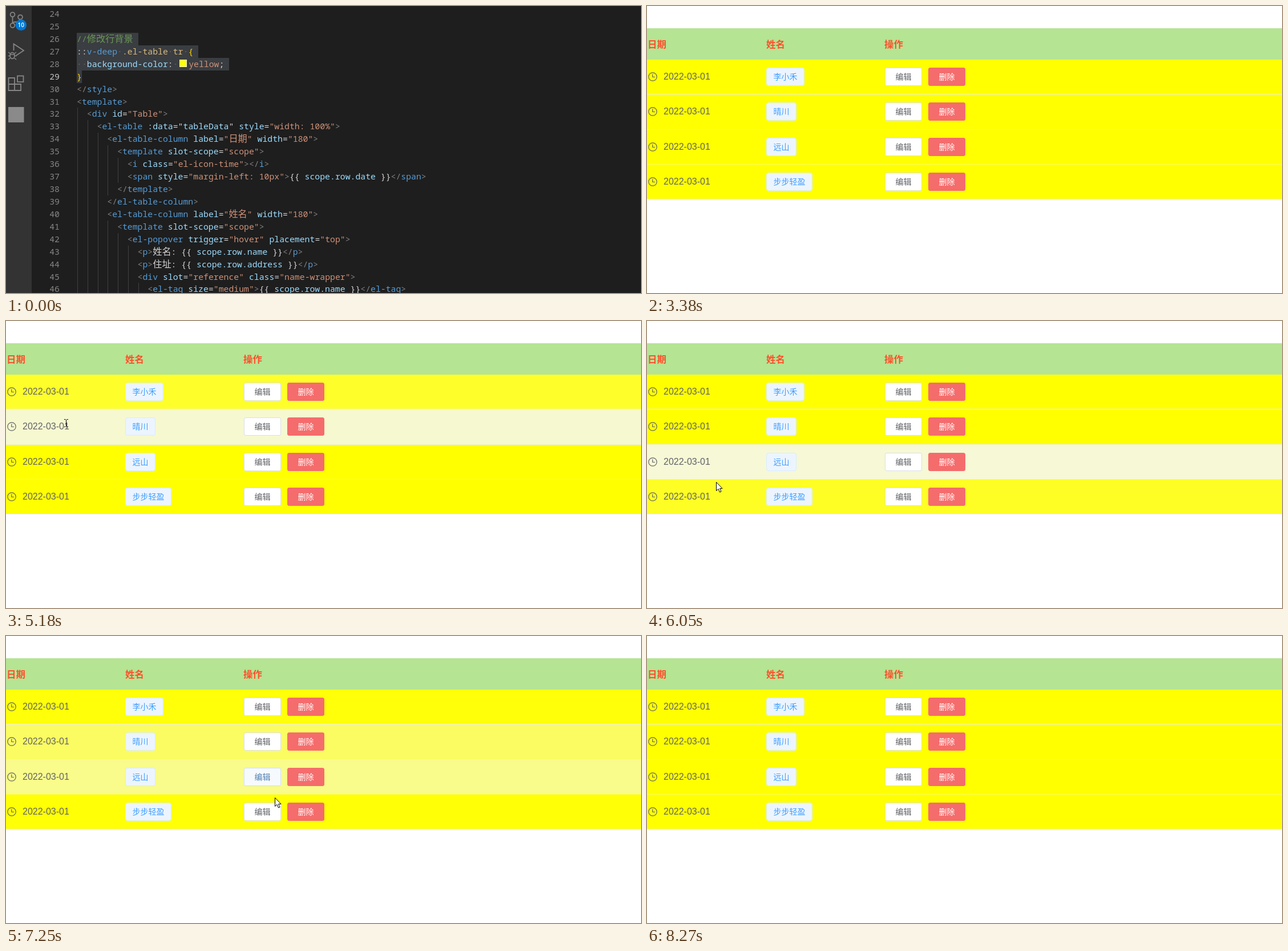
These frames come from a looping animation (1113 by 503 pixels, 8.96 s). An HTML page:

```html
<!DOCTYPE html>
<html lang="zh">
<head>
<meta charset="utf-8">
<title>Table row colours</title>
<style>
html, body { margin: 0; width: 100%; height: 100%; overflow: hidden; }
body { position: relative; background: #fff; }
.view { position: absolute; left: 0; top: 0; width: 1113px; height: 503px; overflow: hidden; }
.view *, .cursor { position: absolute; }

/* editor */
#editor { background: #1e1e1e; }
#bar { left: 0; top: 0; width: 45px; height: 503px; background: #333; }
.line { left: 0; width: 1113px; height: 22px; color: #d4d4d4; white-space: pre;
  font: 14.8px/20px "Noto Sans Mono", "Noto Sans CJK SC", monospace; }
.num { right: 1019px; color: #858585; }
.num.on { color: #c6c6c6; }
.guide { width: 1px; height: 22px; background: #404040; }
.code { left: 124px; height: 22px; }
.code span { position: static; }
.sel { background: #3a3d41; }
.eol { padding-right: 1ch; }
.cj { font: 16.2px/0 "Noto Sans CJK SC", sans-serif; }
.b { color: #808080; } .t { color: #569cd6; } .a { color: #9cdcfe; } .s { color: #ce9178; }
.d { color: #646464; } .k { color: #d7ba7d; } .y { color: #ffd700; } .note { color: #6a9955; }
.code .swatch { display: inline-block; width: 11px; height: 11px; margin: 0 3px 0 2.5px;
  border: 1px solid #eee; background: #ff0; }

/* table page */
#page { background: #fff; font-family: "Noto Sans CJK SC", sans-serif; }
#head { left: 0; top: 39px; width: 1113px; height: 55px; background: #b5e493; }
#head b { top: 0; font-size: 16.4px; line-height: 54px; color: #ff4f2b; }
.row { left: 0; width: 1113px; background: #ff0; border-bottom: 1px solid #ebeef5; }
.row.thin { border-bottom-color: #fbfb60; }
.glow { inset: 0; background: #f5f7fa; opacity: 0; }
.clock { left: 1px; top: 20.5px; width: 18px; height: 18px; }
.date { left: 29px; top: 20px; font: 16px/20px "Liberation Sans", sans-serif; color: #606266; }
.tag, .btn { box-sizing: border-box; top: 14px; height: 32px; font-size: 14px; line-height: 29px;
  border: 1px solid; text-align: center; white-space: nowrap; }
.tag { left: 209px; padding: 0 11.5px; border-radius: 4px; color: #409eff;
  background: #ecf5ff; border-color: #d9ecff; }
.btn { --h: 0%; left: 417px; width: 65px; border-radius: 3px;
  color: color-mix(in srgb, #409eff var(--h), #606266);
  background: color-mix(in srgb, #ecf5ff var(--h), #fff);
  border-color: color-mix(in srgb, #c6e2ff var(--h), #dcdfe6); }
.btn.del { left: 493px; color: #fff; background: #f56c6c; border-color: #f56c6c; }

.cursor { left: 0; top: 0; overflow: visible; pointer-events: none; }
</style>
</head>
<body>
<div class="view" id="editor">
  <div id="bar"></div>
  <svg width="45" height="503" fill="none" stroke="#858585" stroke-width="1.8">
    <circle cx="11.5" cy="15" r="3.9"/><circle cx="11.5" cy="34" r="3.9"/><circle cx="25" cy="19.5" r="3.9"/>
    <path d="M11.5 19v11M25 23.5c0 4-3 4.5-6 4.5h-3q-4 0-4.500 3"/>
    <circle cx="26.300" cy="33.300" r="9.700" fill="#0078d4" stroke="none"/>
    <text x="26.300" y="37" fill="#fff" stroke="none" font-family="Open Sans, sans-serif" font-size="10" font-weight="600" text-anchor="middle">10</text>
    <path d="M13.500 78V66.500L31 78 17.500 87"/>
    <ellipse cx="11" cy="87" rx="4" ry="5.300"/>
    <path d="M7 85h8M4 81l3.500 2.500M18 81l-3.500 2.500M3.500 87.500H7M15 87.500h3.500M4 94l3.500-3M18 94l-3.500-3" stroke-width="1.500"/>
    <path d="M4.500 126h10.500v11h11v11h-21.500zM4.500 137h10.500v11"/>
    <rect x="20" y="122.500" width="10.500" height="10.500"/>
    <rect x="4" y="177" width="27.500" height="27" fill="#8a8a8a" stroke="none"/>
  </svg>
</div>

<div class="view" id="page">
  <div id="head">
    <b style="left:1px">日期</b><b style="left:209px">姓名</b><b style="left:416px">操作</b>
  </div>
</div>

<svg class="cursor" id="arrow" width="14" height="20">
  <path d="M.5.5V15.500L4 12.300 6.500 18 9 17 6.600 11.500H11z" fill="#fff" stroke="#000"/>
</svg>
<svg class="cursor" id="beam" width="7" height="15">
  <path d="M-3 -6.500h2.500M1.500 -6.500h2.500M.5 -6v12M-3 6.500h2.500M1.500 6.500h2.500" fill="none"/>
</svg>

<script>
const $ = id => document.getElementById(id);
const add = (parent, cls, html = '', style = '') => {
  const el = document.createElement('div');
  el.className = cls;
  el.innerHTML = html;
  el.style.cssText = style;
  parent.append(el);
  return el;
};
const span = (cls, s) => `<span class="${cls}">${s}</span>`;

// ---- editor ----
const dot = span('d', '·');
const styles = [
  '', '',
  span('note', '//修改行背景'),
  '::' + span('t', 'v-deep') + dot + span('k', '.el-table') + dot + span('k', 'tr') + dot + span('y', '{'),
  dot + dot + span('a', 'background-color') + ':' + dot + span('swatch', '') + span('s', 'yellow') + ';',
  span('y', '}')
];
const markup = `</style>
<template>
  <div id="Table">
    <el-table :data="tableData" style="width: 100%">
      <el-table-column label="日期" width="180">
        <template slot-scope="scope">
          <i class="el-icon-time"></i>
          <span style="margin-left: 10px">{{ scope.row.date }}</span>
        </template>
      </el-table-column>
      <el-table-column label="姓名" width="180">
        <template slot-scope="scope">
          <el-popover trigger="hover" placement="top">
            <p>姓名: {{ scope.row.name }}</p>
            <p>住址: {{ scope.row.address }}</p>
            <div slot="reference" class="name-wrapper">
              <el-tag size="medium">{{ scope.row.name }}</el-tag>`.split('\n');

const paint = s => s.replace(
  /(<\/?)([\w-]+)|(:\w+)="(\w+)"|("[^"]*")|([\w-]+)(?==)|(scope\.row\.\w+)|>/g,
  (m, open, tag, bind, value, str, attr, expr) =>
    tag ? span('b', open.replace('<', '&lt;')) + span('t', tag) :
    bind ? span('a', bind) + '="' + span('a', value) + '"' :
    str ? span('s', str) :
    attr || expr ? span('a', m) : span('b', '&gt;'));

const CELL = 8.88, LINE = 21.93, FIRST = 24, CARET = 29;
[...styles, ...markup.map(paint)].forEach((html, i) => {
  const n = FIRST + i;
  const line = add($('editor'), 'line', '', `top:${3 + i * LINE}px`);
  const mark = !html || n > CARET ? '' : n < CARET ? ' sel eol' : ' sel';
  add(line, n === CARET ? 'num on' : 'num', n);
  add(line, 'code' + mark, html.replace(/[\u4e00-\u9fff]+/g, s => span('cj', s)));
  const indent = html.startsWith(dot) ? 2 : html.search(/\S/);
  for (let c = 0; c < indent; c += 2) add(line, 'guide', '', `left:${125 + c * CELL}px`);
});

// ---- table ----
const rowTop = i => Math.round(94 + i * 61.35);
const clock = `<svg width="18" height="18" fill="none" stroke="#606266" stroke-width="1.2">
  <circle cx="9" cy="9" r="7.200"/><path d="M8.800 4.500V9.500H13"/></svg>`;
const rows = ['李小禾', '晴川', '远山', '步步轻盈'].map((name, i) => {
  const top = rowTop(i), bottom = rowTop(i + 1);
  const row = add($('page'), i === 2 ? 'row thin' : 'row', '', `top:${top}px;height:${bottom - top - 1}px`);
  const glow = add(row, 'glow');
  add(row, 'clock', clock);
  add(row, 'date', '2022-03-01');
  add(row, 'tag', name);
  const edit = add(row, 'btn', '编辑');
  add(row, 'btn del', '删除');
  return { top, bottom, glow, edit };
});

// ---- motion ----
const LOOP = 8960, SWITCH = 3380;

// pointer stops: x, y, arrival, departure
const editorStops = [
  [833, 449, 290], [271, 239, 570, 720], [296, 114, 1040, 1200],
  [367, 82, 1640], [304, 111, 2080, 2160], [336, 334, 2740]
];
const pageStops = [
  [140, 345, 4150], [98, 123, 4420, 4880], [100, 154, 5040], [105, 179, 5180],
  [118, 252, 5700, 5920], [120, 277, 6010], [120, 282, 6050], [570, 282, 6650],
  [600, 212, 6680], [634, 168, 6810, 6870], [455, 122, 7000], [478, 217, 7170],
  [471, 283, 7250], [455, 334, 7550, 7690], [470, 358, 8270]
];

// pointer position, or null while it is away
function locate(stops, t) {
  const i = stops.findIndex(s => t < s[2]);
  if (i < 1) return null;
  const [x, y, arrive, leave = arrive] = stops[i - 1], [nx, ny, next] = stops[i];
  const f = Math.max(0, (t - leave) / (next - leave));
  return [x + (nx - x) * f, y + (ny - y) * f];
}

const within = (p, top, bottom, left = 0, right = 1113) =>
  p && p[1] >= top && p[1] < bottom && p[0] >= left && p[0] < right;

// The "ease" curve as weights over the recent past: a hover fades in and out by itself.
const STEPS = 40;
const easeX = u => .75 * u * (1 - u) + u ** 3;
const easeY = u => .3 * u * (1 - u) ** 2 + 3 * u * u * (1 - u) + u ** 3;
function fade(hovered, t, duration) {
  let sum = 0;
  for (let i = 0; i < STEPS; i++) {
    const past = locate(pageStops, t - duration * easeX((i + .5) / STEPS));
    if (hovered(past)) sum += easeY((i + 1) / STEPS) - easeY(i / STEPS);
  }
  return sum;
}

const show = (el, on) => { el.style.visibility = on ? 'visible' : 'hidden'; };

function draw(t) {
  const onPage = t >= SWITCH;
  show($('page'), onPage);
  show($('editor'), !onPage);
  for (const { top, bottom, glow, edit } of rows) {
    glow.style.opacity = fade(p => within(p, top, bottom), t, 250);
    const tint = fade(p => within(p, top + 14, top + 46, 417, 482), t, 100);
    edit.style.setProperty('--h', tint * 100 + '%');
  }

  const at = locate(onPage ? pageStops : editorStops, t);
  const text = !onPage || rows.some(r => within(at, r.top + 20, r.top + 40, 28, 112));
  show($('arrow'), at && !text);
  show($('beam'), at && text);
  $('beam').style.stroke = onPage ? '#000' : '#fff';
  if (!at) return;
  const [x, y] = at.map(Math.round);
  for (const id of ['arrow', 'beam']) $(id).style.transform = `translate(${x}px, ${y}px)`;
}

const start = performance.now();
(function tick() {
  draw((performance.now() - start) % LOOP);
  requestAnimationFrame(tick);
})();
</script>
</body>
</html>
```
